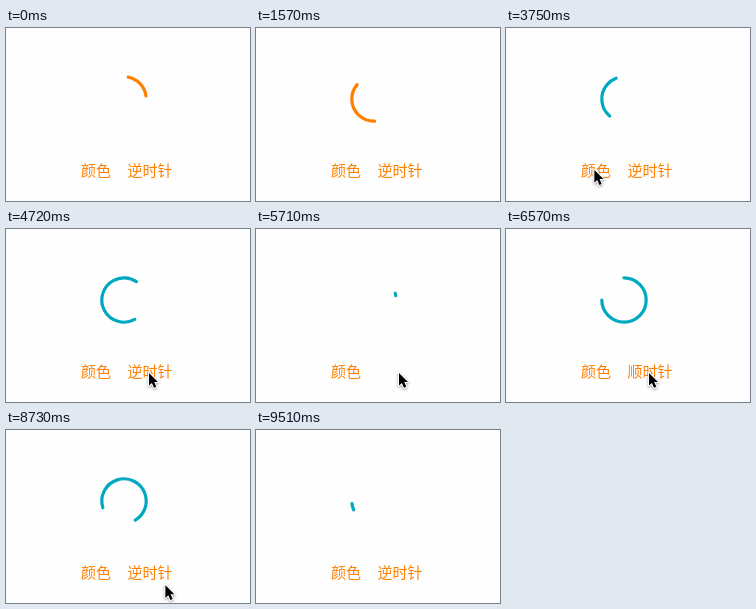
Recreate the animation shown at these times as an HTML page with a canvas. Size 244 px wide and 173 px high, loop 9.53 s.

```html
<!DOCTYPE html>
<html lang="zh-CN">
<head>
<meta charset="utf-8">
<title>Spinner</title>
<style>
  html, body { margin: 0; width: 100%; height: 100%; overflow: hidden; background: #fefefe; }
  canvas { display: block; width: 244px; height: 173px; }
</style>
</head>
<body>
<canvas id="stage"></canvas>
<script>
const WIDTH = 244, HEIGHT = 173, LOOP = 9530;
const ORANGE = '#ff8000', TEAL = '#00a8c0';
const COLOR_CLICK = { press: 2540, release: 2690 };
const REVERSE_CLICK = { press: 5470, release: 5610 };
const FORWARD_CLICK = { press: 7790, release: 7933 };
const DIMMED = 0.2;

const canvas = document.getElementById('stage');
const ctx = canvas.getContext('2d');
const scale = window.devicePixelRatio || 1;
canvas.width = WIDTH * scale;
canvas.height = HEIGHT * scale;

const clamp = x => Math.min(1, Math.max(0, x));
const mix = (a, b, p) => a + (b - a) * p;
const progress = (t, from, to) => clamp((t - from) / (to - from));

// cubic-bezier(.42, 0, .58, 1), solved by bisection
function ease(x) {
  let low = 0, high = 1;
  for (let i = 0; i < 24; i++) {
    const s = (low + high) / 2, r = 1 - s;
    if (3 * r * r * s * 0.42 + 3 * r * s * s * 0.58 + s * s * s < x) low = s;
    else high = s;
  }
  return low * low * (3 - 2 * low);
}

// Each direction change restarts the spinner's clock (in seconds).
function spinnerState(t) {
  if (t < REVERSE_CLICK.release) return { clock: -1.145 + t * 0.001043, direction: 1 };
  if (t < FORWARD_CLICK.release) return { clock: (t - REVERSE_CLICK.release) * 0.001042, direction: -1 };
  return { clock: (t - FORWARD_CLICK.release) * 0.001062, direction: 1 };
}

function drawSpinner(t) {
  const { clock, direction } = spinnerState(t);
  const phase = ((clock % 1.5) + 1.5) % 1.5;
  const grow = ease(clamp(phase));
  const shrink = ease(clamp((phase - 1) / 0.5));
  const start = 0.25 * grow + 0.75 * shrink;
  const angle = turn => direction * 2 * Math.PI * (clock / 4 + turn);
  ctx.beginPath();
  ctx.arc(118, 71, 22.2, angle(start), angle(Math.max(grow, start + 0.0005)), direction < 0);
  ctx.lineWidth = 3.2;
  ctx.lineCap = 'round';
  ctx.strokeStyle = t < COLOR_CLICK.release ? ORANGE : TEAL;
  ctx.stroke();
}

function drawLabel(text, x, alpha) {
  ctx.globalAlpha = alpha;
  ctx.fillStyle = ORANGE;
  ctx.fillText(text, x, 148);
  ctx.globalAlpha = 1;
}

function colorAlpha(t) {
  const { press, release } = COLOR_CLICK;
  if (t < press) return 1;
  return mix(DIMMED, 1, progress(t, release, release + 270));
}

// The old title fades out before the new one fades in.
function titleAlpha(t, { press, release }) {
  if (t < press) return 1;
  const swap = release + 110;
  return t < swap
    ? mix(DIMMED, 0, progress(t, release, swap))
    : progress(t, swap, release + 400);
}

function drawButtons(t) {
  ctx.font = '15px "Noto Sans CJK SC", "Noto Sans CJK", sans-serif';
  drawLabel('颜色', 75, colorAlpha(t));
  const click = t < FORWARD_CLICK.press ? REVERSE_CLICK : FORWARD_CLICK;
  const reversed = t >= REVERSE_CLICK.release + 110 && t < FORWARD_CLICK.release + 110;
  drawLabel(reversed ? '顺时针' : '逆时针', 121.5, titleAlpha(t, click));
}

const MOVES = [
  { from: [80, 153], to: [86, 142], start: 1850, end: 2000 },
  { from: [86, 142], to: [143, 144], start: 3650, end: 4350 },
  { from: [143, 144], to: [188, 175], start: 8500, end: 9050 }
];

function drawCursor(t) {
  const move = MOVES.filter(m => t >= m.start).pop();
  if (!move || t >= 9050) return;
  const p = ease(progress(t, move.start, move.end));
  ctx.save();
  ctx.translate(mix(move.from[0], move.to[0], p), mix(move.from[1], move.to[1], p));
  const arrow = new Path2D('M0 0V12.6L2.9 9.9L5 14.8L7.3 13.8L5.2 9H9Z');
  ctx.lineJoin = 'round';
  ctx.lineWidth = 2;
  ctx.strokeStyle = '#fff';
  ctx.shadowColor = 'rgba(0, 0, 0, 0.4)';
  ctx.shadowBlur = 2.5 * scale;
  ctx.shadowOffsetY = scale;
  ctx.stroke(arrow);
  ctx.shadowColor = 'transparent';
  ctx.fillStyle = '#000';
  ctx.fill(arrow);
  ctx.restore();
}

function draw(t) {
  ctx.setTransform(scale, 0, 0, scale, 0, 0);
  ctx.fillStyle = '#fefefe';
  ctx.fillRect(0, 0, WIDTH, HEIGHT);
  drawSpinner(t);
  drawButtons(t);
  drawCursor(t);
}

const origin = performance.now();
function tick() {
  draw((performance.now() - origin) % LOOP);
  requestAnimationFrame(tick);
}
tick();
</script>
</body>
</html>
```
